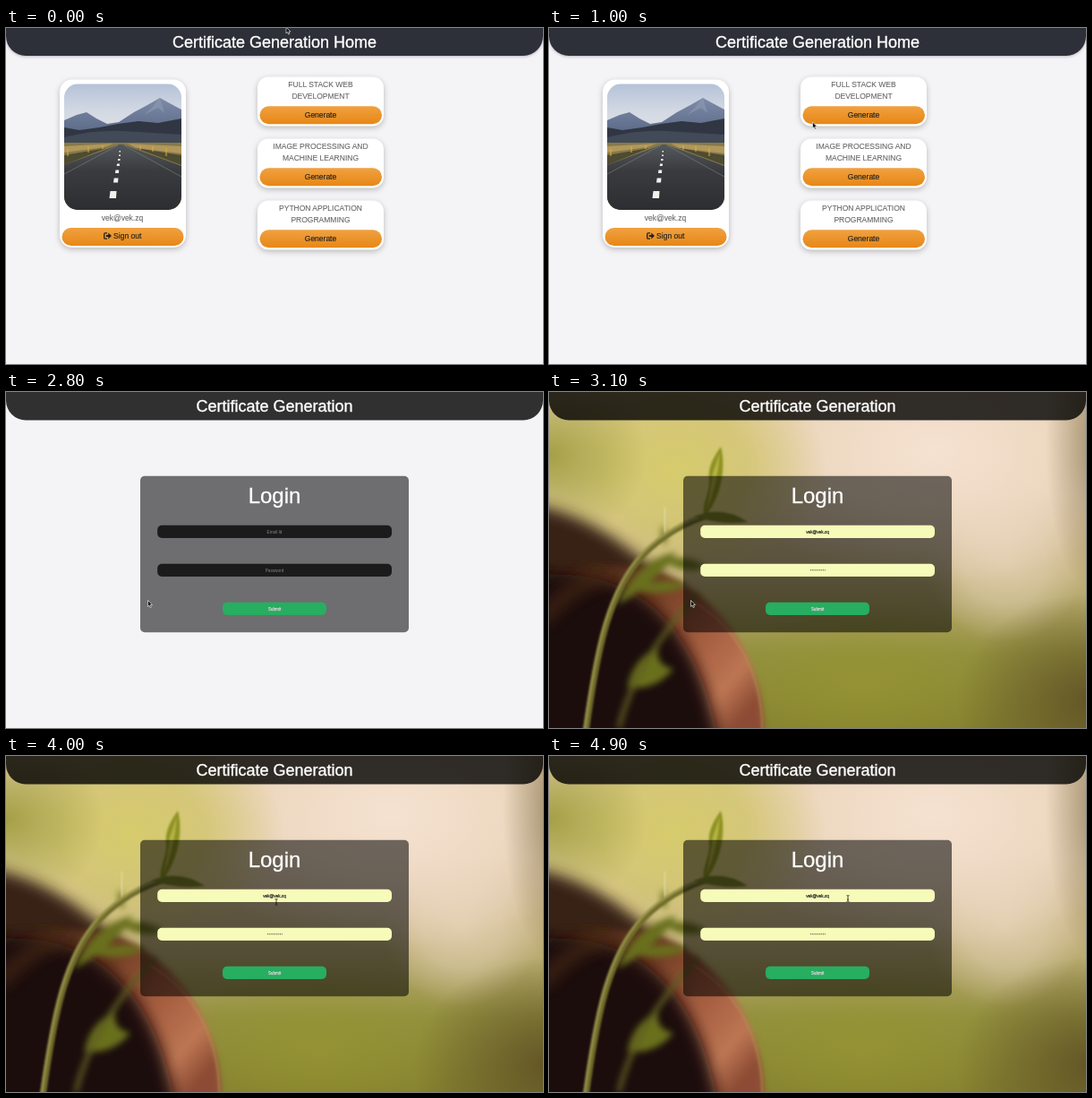
These frames come from a looping animation (600 by 375 pixels, 5 s). An HTML page:

```html
<!DOCTYPE html>
<html lang="en">
<head>
<meta charset="utf-8">
<title>Certificate Generation</title>
<style>
  html, body { margin: 0; width: 100%; height: 100%; overflow: hidden; background: #f4f3f6; }
  svg { display: block; width: 600px; height: 375px; }
  text { font-family: "Liberation Sans", Arial, sans-serif; text-anchor: middle; font-size: 8.5px; }
  .title { font-size: 18px; fill: #fff; stroke: #fff; stroke-width: .35px; }
  .login { font-size: 24px; fill: #fff; stroke: #fff; stroke-width: .3px; }
  .label { fill: #666; stroke: #666; stroke-width: .1px; }
  .btn { fill: #222; stroke: #222; stroke-width: .15px; }
  .tiny { font-size: 4.7px; }
  .hint { fill: #858585; }
  .value { fill: #222; stroke: #222; stroke-width: .2px; }
  .submit { fill: #fff; stroke: #fff; stroke-width: .25px; text-shadow: 0 .5px .6px #163; }
  .card { fill: #fff; filter: drop-shadow(0 2px 3px rgba(0, 0, 0, .24)); }
  .bar { filter: drop-shadow(0 1px 1.5px rgba(60, 30, 80, .3)); }
</style>
</head>
<body>
<svg viewBox="0 0 600 375">
  <defs>
    <linearGradient id="orange" x2="0" y2="1">
      <stop stop-color="#f0a140"/><stop offset="1" stop-color="#e78717"/>
    </linearGradient>
    <linearGradient id="sky" x2="0" y2="1">
      <stop stop-color="#b4c2d8"/><stop offset=".22" stop-color="#d3d9e3"/><stop offset=".4" stop-color="#dfe2e6"/>
    </linearGradient>
    <linearGradient id="peak" x2="0" y2="1">
      <stop stop-color="#7d8ba8"/><stop offset="1" stop-color="#505f7d"/>
    </linearGradient>
    <linearGradient id="road" x2="0" y2="1">
      <stop stop-color="#55585c"/><stop offset=".4" stop-color="#393b3f"/><stop offset="1" stop-color="#2d2e31"/>
    </linearGradient>
    <linearGradient id="field" x2="0" y2="1">
      <stop stop-color="#ead0ad"/><stop offset=".3" stop-color="#e6d0b0"/>
      <stop offset=".55" stop-color="#c3b27e"/><stop offset=".78" stop-color="#93903f"/><stop offset="1" stop-color="#85812f"/>
    </linearGradient>
    <radialGradient id="cream">
      <stop stop-color="#f6e2d2"/><stop offset=".5" stop-color="#f0dcc8" stop-opacity=".8"/><stop offset="1" stop-color="#ecd8c8" stop-opacity="0"/>
    </radialGradient>
    <radialGradient id="olive">
      <stop stop-color="#969531" stop-opacity=".95"/><stop offset="1" stop-color="#969531" stop-opacity="0"/>
    </radialGradient>
    <radialGradient id="lime">
      <stop stop-color="#d6cb6c"/><stop offset=".5" stop-color="#cfc468" stop-opacity=".75"/><stop offset="1" stop-color="#cfc468" stop-opacity="0"/>
    </radialGradient>
    <radialGradient id="shade">
      <stop stop-color="#5c4d24" stop-opacity=".85"/><stop offset="1" stop-color="#5c4d24" stop-opacity="0"/>
    </radialGradient>
    <linearGradient id="clay" gradientUnits="userSpaceOnUse" x1="20" y1="150" x2="235" y2="340">
      <stop stop-color="#2b190e"/><stop offset=".4" stop-color="#6b3a22"/><stop offset=".65" stop-color="#a0593c"/>
      <stop offset=".88" stop-color="#bd7653"/><stop offset="1" stop-color="#8d4c34"/>
    </linearGradient>
    <filter id="soft1"><feGaussianBlur stdDeviation="1"/></filter>
    <filter id="soft4" x="-30%" y="-30%" width="160%" height="160%"><feGaussianBlur stdDeviation="3.5"/></filter>
    <filter id="soft9" x="-30%" y="-30%" width="160%" height="160%"><feGaussianBlur stdDeviation="8"/></filter>
    <clipPath id="frame"><rect x="65" y="62.5" width="131" height="140.5" rx="15"/></clipPath>
  </defs>
  <rect width="600" height="375" fill="#f4f3f6"/>

  <g id="home">
    <path class="bar" fill="#2d3038" d="M0-5H600V9A22 22 0 0 1 578 31H22A22 22 0 0 1 0 9Z"/>
    <text class="title" x="300" y="22">Certificate Generation Home</text>
    <rect class="card" x="60" y="57.5" width="141" height="187.5" rx="14"/>
    <g clip-path="url(#frame)">
      <rect x="65" y="62" width="131" height="141" fill="url(#sky)"/>
      <path fill="url(#peak)" d="M65 103L79 97 90 94 101 101 113 107 126 105 143 94 158 86 172 78 181 83 196 91V130H65Z"/>
      <path fill="#8f9bb3" opacity=".6" d="M172 78L162 90 154 97 170 89 177 95Z"/>
      <path fill="#303642" d="M65 111L82 114 104 111 125 107 148 104 170 106 196 101V130H65Z"/>
      <path fill="#424957" d="M65 122Q100 113 132 115T196 119V132H65Z"/>
      <rect x="65" y="128" width="131" height="75" fill="#857a49"/>
      <path fill="#b1975c" d="M65 132L120 129 110 133 65 139ZM196 132L136 129 146 134 196 140Z"/>
      <path fill="#4d4b31" d="M65 142L112 134 65 153ZM196 142L145 134 196 153Z"/>
      <path fill="url(#road)" d="M126.500 130H130.500L150 137 196 154V203H65V153L108 137Z"/>
      <path fill="none" stroke="#777974" stroke-width=".7" d="M125 131L65 163M132 131L196 166"/>
      <path fill="#f0f0ed" d="M116.500 182H123.500L123 190H115.500ZM120.700 167.500H125.500L125 172.500H120ZM122.400 158.500H126.200L126 162H122ZM124 151.500H127L126.800 154H123.700ZM125 146H127.500V148H125ZM126 141.500H128V143H126ZM126.500 137H128V138.500H126.500Z"/>
      <path stroke="#e5ad36" stroke-width="1" d="M69 135V143M92 132V139M108 131V135M150 131V136M164 132V138M179 134V143"/>
    </g>
    <text class="label" x="130" y="214.500">vek@vek.zq</text>
    <rect x="62.500" y="223" width="136" height="20" rx="10" fill="url(#orange)"/>
    <path fill="none" stroke="#222" stroke-width="1.300" d="M113 228.800H110.800Q109.700 228.800 109.700 230V234Q109.700 235.200 110.800 235.200H113"/>
    <path fill="#222" d="M111.800 230.900H114.300V228.600L118 232 114.300 235.400V233.100H111.800Z"/>
    <text class="btn" x="135.700" y="235.300">Sign out</text>
    <g id="courses"></g>
  </g>

  <g id="sign">
    <g id="photo">
      <rect width="600" height="375" fill="url(#field)"/>
      <ellipse cx="430" cy="65" rx="240" ry="150" fill="url(#cream)"/>
      <ellipse cx="510" cy="190" rx="90" ry="90" fill="url(#cream)" opacity=".5"/>
      <ellipse cx="140" cy="85" rx="170" ry="130" fill="url(#lime)"/>
      <ellipse cx="0" cy="70" rx="110" ry="100" fill="url(#olive)" opacity=".85"/>
      <ellipse cx="350" cy="325" rx="170" ry="90" fill="url(#olive)" opacity=".8"/>
      <ellipse cx="605" cy="345" rx="150" ry="120" fill="url(#shade)"/>
      <ellipse cx="615" cy="60" rx="60" ry="170" fill="url(#shade)" opacity=".65"/>
      <path filter="url(#soft9)" fill="#382113" d="M-40 122Q25 130 75 165T165 245L210 400H-40Z"/>
      <path filter="url(#soft4)" fill="url(#clay)" d="M-20 195Q60 190 105 196C185 215 243 295 240 390H-20Z"/>
      <path filter="url(#soft1)" fill="none" stroke="#c98361" stroke-width="2" opacity=".55" d="M160 233C212 263 239 318 238 380"/>
      <path filter="url(#soft9)" fill="#1b0f08" d="M-30 205Q70 195 122 245T190 395H-30Z"/>
      <path filter="url(#soft9)" fill="none" stroke="#4a2a18" stroke-width="16" opacity=".7" d="M-10 255Q25 215 62 205"/>
      <g filter="url(#soft4)" fill="#69701f">
        <path d="M76 238Q95 190 142 178 128 207 76 238ZM92 220Q130 205 155 215 130 230 92 220ZM88 330Q92 300 122 284 118 305 139 309 120 333 88 330Z"/>
        <path fill="none" stroke="#5f5e22" stroke-width="5" d="M78 375Q96 300 166 226"/>
        <path d="M127 148Q134 160 130 172 122 162 127 148ZM125 187Q155 180 176 195 152 206 125 187Z"/>
      </g>
      <path filter="url(#soft1)" fill="none" stroke="#e3d9a2" stroke-width="3" opacity=".65" d="M129 129Q128 148 131 163"/>
      <g filter="url(#soft1)">
        <path fill="none" stroke="#6f6c2b" stroke-width="7" d="M41 380C53 293 65 225 105 182Q138 149 181 137"/>
        <path fill="none" stroke="#9c964d" stroke-width="2.500" d="M39 380C51 293 63 223 104 180Q136 147 181 136"/>
        <path fill="#8d9222" d="M192 61C199 87 190 122 174 139 169 129 180 112 179 98 177 82 186 70 192 61Z"/>
        <path fill="#b7b344" d="M191 67Q188 105 176 132 181 106 183 91Z"/>
        <path fill="#7c8127" d="M162 139Q194 126 222 145 193 149 162 139Z"/>
      </g>
    </g>
    <path fill="#000" fill-opacity=".8" d="M0 0H600V9.400A22 22 0 0 1 578 31.400H22A22 22 0 0 1 0 9.400Z"/>
    <text class="title" x="300" y="22">Certificate Generation</text>
    <rect x="150" y="93.700" width="300" height="174.500" rx="5" fill="#000" fill-opacity=".55"/>
    <text class="login" x="300" y="124">Login</text>
    <g id="empty">
      <g fill="#1b1b1b"><rect x="169.200" y="148.700" width="261.800" height="14.200" rx="5"/><rect x="169.200" y="191.700" width="261.800" height="14.200" rx="5"/></g>
      <text class="tiny hint" x="300" y="157.700">Email Id</text>
      <text class="tiny hint" x="300" y="200.700">Password</text>
    </g>
    <g id="filled">
      <g fill="#f7fbb9"><rect x="169.200" y="148.700" width="261.800" height="14.200" rx="5"/><rect x="169.200" y="191.700" width="261.800" height="14.200" rx="5"/></g>
      <text class="tiny value" x="300" y="157.700">vek@vek.zq</text>
      <path fill="none" stroke="#222" stroke-width="1.100" stroke-linecap="round" stroke-dasharray="0 1.750" d="M292.500 198.700H308.500"/>
    </g>
    <rect x="242" y="234.800" width="116" height="14.200" rx="5" fill="#27ae60"/>
    <text class="tiny submit" x="300" y="243.500">Submit</text>
  </g>

  <g id="pointer">
    <path id="arrow" fill="#111" stroke="#fff" stroke-width=".6" d="M0 0V7L1.600 5.600 2.700 8.100 3.900 7.600 2.800 5.100H5Z"/>
    <path id="beam" fill="none" stroke="#222" stroke-width=".8" d="M-1.500-3.500Q0-3.500 0-2.500V2.500Q0 3.500-1.500 3.500M1.500-3.500Q0-3.500 0-2.500M0 2.500Q0 3.500 1.500 3.500M-1 1H1"/>
  </g>
</svg>
<script>
const LOOP = 5000, STEP = 100, LOGIN = 2600, LOADED = 3000;
const $ = id => document.getElementById(id);

const courses = [
  ["FULL STACK WEB", "DEVELOPMENT"],
  ["IMAGE PROCESSING AND", "MACHINE LEARNING"],
  ["PYTHON APPLICATION", "PROGRAMMING"]
];
$("courses").innerHTML = courses.map(([a, b], i) => `
  <g transform="translate(281 ${54.5 + i * 69})">
    <rect class="card" width="141" height="55" rx="12"/>
    <text class="label" x="70.5" y="11.5">${a}</text>
    <text class="label" x="70.5" y="24.2">${b}</text>
    <rect x="2.5" y="32.7" width="136.500" height="20" rx="10" fill="url(#orange)"/>
    <text class="btn" x="70.5" y="45.5">Generate</text>
  </g>`).join("");

// time, x, y of the pointer
const path = [
  [0, 313, -1], [200, 313, 0], [1000, 294.5, 105], [1200, 293, 108],
  [1900, 164, 220], [2200, 158.5, 232.5], [3300, 158.5, 232.5],
  [4000, 302, 163], [4600, 334, 159], [5000, 334, 159]
];
const ease = u => u * u * (3 - 2 * u);

function pointerAt(t) {
  const i = path.findIndex(p => p[0] > t);
  const [t0, x0, y0] = path[i - 1], [t1, x1, y1] = path[i];
  const u = ease((t - t0) / (t1 - t0));
  return [x0 + (x1 - x0) * u, y0 + (y1 - y0) * u];
}

const show = (id, on) => { $(id).style.display = on ? "" : "none"; };

function draw() {
  const t = Math.floor(performance.now() % LOOP / STEP) * STEP;
  const login = t >= LOGIN, loaded = t >= LOADED;
  const [x, y] = pointerAt(t);
  const typing = login && x > 169 && x < 431 && y > 149 && y < 164;
  show("home", !login);
  show("sign", login);
  show("photo", loaded);
  show("filled", loaded);
  show("empty", !loaded);
  show("arrow", !typing);
  show("beam", typing);
  $("pointer").setAttribute("transform", `translate(${x} ${y})`);
  requestAnimationFrame(draw);
}
draw();
</script>
</body>
</html>
```
